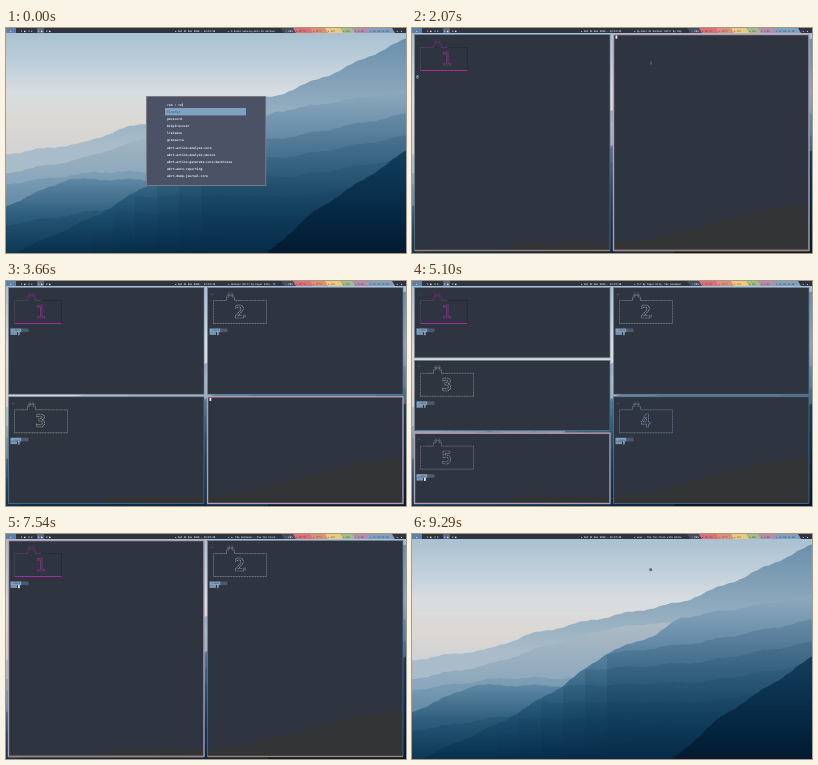
An HTML page with a canvas that plays this animation: 400 px wide and 225 px high, repeating every 9430 ms.

```html
<!DOCTYPE html>
<html lang="en">
<head>
<meta charset="utf-8">
<title>Tiling desktop</title>
<style>
html, body { margin: 0; width: 100%; height: 100%; overflow: hidden; background: #2e3440; }
canvas { display: block; width: 400px; height: 225px; }
</style>
</head>
<body>
<canvas id="stage" width="400" height="225"></canvas>
<script>
const LOOP = 9430, W = 400, H = 225;
const MONO = '"DejaVu Sans Mono", monospace';
const LIGHT = '#e5e9f0', BLUE = '#81a1c1', DARK = '#2e3440';
const stage = document.getElementById('stage').getContext('2d');
let g = stage;

const ramp = (t, start, length) => Math.max(0, Math.min(1, (t - start) / length));
const smooth = v => v * v * (3 - 2 * v);

function box(x, y, w, h, color) {
  g.fillStyle = color;
  g.fillRect(x, y, w, h);
}
function text(s, x, y, size, color, weight = '') {
  g.font = `${weight} ${size}px ${MONO}`;
  g.fillStyle = color;
  g.fillText(s, x, y);
}
function line(points, color, width = 0.6) {
  g.strokeStyle = color;
  g.lineWidth = width;
  g.beginPath();
  points.forEach(([x, y]) => g.lineTo(x, y));
  g.stroke();
}
function gradient(y0, y1, colors) {
  const fill = g.createLinearGradient(0, y0, 0, y1);
  colors.forEach((c, i) => fill.addColorStop(i / (colors.length - 1), c));
  return fill;
}

// ---------- wallpaper ----------
// A slope through a few key points, roughened by two sines.
function ridge(points, colors) {
  const top = Math.min(...points.map(p => p[1]));
  g.fillStyle = gradient(top, H, colors);
  g.beginPath();
  g.moveTo(points[0][0], H);
  points.slice(1).forEach(([bx, by], i) => {
    const [ax, ay] = points[i];
    for (let x = ax; x <= bx; x++)
      g.lineTo(x, ay + (by - ay) * (x - ax) / (bx - ax) + Math.sin(x * 0.55) * 0.3 + Math.sin(x * 0.14) * 0.9);
  });
  g.lineTo(points.at(-1)[0], H);
  g.fill();
}
function paintWallpaper() {
  const canvas = document.createElement('canvas');
  canvas.width = W;
  canvas.height = H;
  g = canvas.getContext('2d');
  box(0, 0, W, H, gradient(0, 130, ['#a6bfd1', '#bccdd9', '#d8dde0', '#dcd8d3', '#ced1d4']));
  ridge([[60, 122], [115, 101], [180, 86], [270, 68], [330, 44], [400, 11]], ['#6b90ac', '#a9bdca', '#b9c8d1']);
  ridge([[0, 126], [85, 114], [180, 130]], ['#aabcc9', '#a9bdca']);
  ridge([[0, 145], [75, 131], [140, 110], [190, 96], [240, 89], [290, 90]], ['#adbbc5', '#88a5bb', '#41708f']);
  ridge([[0, 156], [90, 144], [170, 144]], ['#7f9fb6', '#41708f']);
  ridge([[0, 178], [62, 151], [150, 152], [180, 160]], ['#5f88a4', '#2c5d7c', '#123f5d']);
  ridge([[0, 197], [120, 178]], ['#2c5d7c', '#0c3854']);
  ridge([[10, 224], [90, 188], [150, 152], [195, 119], [245, 100], [268, 84], [400, 62]],
    ['#8ea9bd', '#6a8fab', '#427190', '#1d4e6e', '#07304d']);
  for (let k = 0; k < 6; k++)
    ridge([[195 - 22 * k, 120 + 16 * k], [290, 108 + 20 * k], [W, 86 + 22 * k]], ['#123f5d2c', '#04284530']);
  ridge([[262, 224], [310, 182], [360, 150], [W, 123]], ['#123f5d', '#072c49', '#021a31']);
  g = stage;
  return canvas;
}
const wallpaper = paintWallpaper();

// ---------- top bar ----------
const SONG = 'A Quiet Lake-by-Owls On Harbour Hill? By Paper Kite, The Gardener - The Tin Clock with Winter - Low Tide Suite';
const PILLS = [
  [275, '#434c5e', ' ♪ 26%'], [287, '#dc6f78', '▪ 28 5%'], [304, '#dd9078', '▪ 47°C'], [319, '#ebcb7f', '▪ 12%'],
  [334, '#a3be8c', '▪ 68%'], [346, '#b48ead', '▪ 3.4G'], [361, BLUE, '▪ 21 kB 14 kB'], [386, DARK, ' ▪  ▪']
];
function drawBar(t) {
  const label = (s, x, color = LIGHT) => text(s, x, 3.6, 2.4, color, 'bold');
  box(0, 0, W, 5, DARK);
  box(0, 0, 10, 5, '#5e81ac');
  box(31, 0, 7, 5, '#56657d');
  label('▪', 4);
  label('1 ■  2 ≡', 15);
  label('3 ■', 32);
  label('4 ■', 40);
  label(`▪ Sat 21 Dec 2019 - 12:37:${20 + Math.floor((t + 910) / 1000)}`, 169);
  const at = Math.floor(t / 150);
  label('▪ ' + SONG.slice(at, at + 31), 222, '#c9cfd9');
  for (const [x, fill, s] of PILLS) {
    g.fillStyle = fill;
    g.beginPath();
    for (const [px, py] of [[x, 0], [W, 0], [W, 5], [x + 3, 5]]) g.lineTo(px, py);
    g.fill();
    label(s, x + 3, s[0] === ' ' ? LIGHT : '#2e344099');
  }
}

// ---------- launcher ----------
const PROGRAMS = ['firefox', 'pmrecord', 'bzip2recover', 'lrelease', 'gresource', 'abrt-action-analyze-core',
  'abrt-action-analyze-vmcore', 'abrt-action-generate-core-backtrace', 'abrt-auto-reporting',
  'abrt-dump-journal-core', 'cool-retro-term'];
function drawLauncher(t) {
  const query = 'retro'.slice(0, 2 + Math.floor(t / 150));
  g.globalAlpha = 1 - ramp(t, 640, 330);
  box(140, 68, 120, 89.5, '#4b5266');
  g.strokeStyle = '#8b8588';
  g.lineWidth = 0.8;
  g.strokeRect(140.4, 68.4, 119.4, 89);
  text('run : ' + query, 161, 78, 3.1, LIGHT, 'bold');
  box(161 + (6 + query.length) * 1.87, 75.3, 0.6, 3.2, LIGHT);
  box(159, 80, 81, 7.4, BLUE);
  PROGRAMS.filter(p => p.includes(query)).slice(0, 10).forEach((p, i) =>
    text(p, 161, 85 + i * 7.12, 3.1, i ? LIGHT : '#4a6486', 'bold'));
  g.globalAlpha = 1;
}

// ---------- terminals ----------
const INKS = ['#a02b9c', '#a4a9b1', '#aeb09a', '#7f9fbd', '#8f97a8'];
const CLOSE = [8540, 7810, 6890, 6300, 5910];
const TERMS = INKS.map((ink, i) => {
  const open = 1020 + 755 * i;
  return { ink, open, art: open + 900, prompt: open + 1055, close: CLOSE[i], fadeIn: i ? 290 : 600, fadeOut: i ? 300 : 720 };
});

// Windows fill two columns in turn; each column shares its height evenly.
function place(i, count) {
  const col = i % 2, rows = Math.ceil((count - col) / 2), step = 218.5 / rows;
  return { x: col ? 201.5 : 2.5, y: 6.5 + (i >> 1) * step, w: count === 1 ? 395 : 195.5, h: step - 2.5 };
}

function drawArt(i, x, y, ink) {
  const mid = x + 23, right = x + (i ? 59 : 53), top = y + 13, bottom = y + 36;
  g.setLineDash([1.1, 0.5]);
  for (const s of [-1, 1])
    line([[mid + s * 10, top], [mid + s * 4, top], [mid + s * 4, y + 9.5], [mid + s * 1.5, y + 9.5], [mid + s * 1.5, y + 5]], ink);
  line([[mid - 3.5, y + 7.5], [mid + 3.5, y + 7.5]], ink);
  line([[mid - 10, top], [x + 6, top], [x + 6, bottom]], i ? ink : '#6f6077', 0.5);
  line([[mid + 10, top], [right, top], [right, bottom]], i ? ink : '#171b24', 0.5);
  if (!i) g.setLineDash([]);
  line([[x + 6, bottom], [right, bottom]], ink, i ? 0.6 : 1.2);
  g.font = `${i ? 'bold' : ''} 17px ${MONO}`;
  g.lineWidth = 0.7;
  g.strokeStyle = ink;
  g.strokeText(i + 1, x + 27, y + 30.5);
  g.setLineDash([]);
  text('~/', x + 3, y + 7, 2.4, ink);
}
function drawCaret(x, y, focused) {
  if (focused) return box(x, y, 1.8, 3.2, LIGHT);
  g.strokeStyle = '#c3cad6';
  g.lineWidth = 0.5;
  g.strokeRect(x + 0.3, y + 0.3, 1.3, 2.6);
}
function drawPrompt(x, y) {
  box(x + 2, y + 41, 11, 3.6, BLUE);
  box(x + 13, y + 41, 7, 3.6, '#4c5a70');
  box(x + 2, y + 44.6, 6.5, 2.8, '#7897b8');
  text('~/demo', x + 3, y + 43.8, 2.4, '#34465c');
}
// Dark foot of the wallpaper showing through a settled terminal.
function drawShade() {
  g.fillStyle = '#323435';
  g.beginPath();
  g.moveTo(100, H);
  for (let x = 100; x <= W; x += 4) g.lineTo(x, 215 - 38 * smooth(ramp(x, 195, 205)) + Math.sin(x * 0.14));
  g.lineTo(W, H);
  g.fill();
}

function drawWindow(i, t, count) {
  const term = TERMS[i], closing = t >= term.close;
  const { x, y, w, h } = place(i, closing ? i + 1 : count);
  const focused = i === (t > CLOSE[4] ? 0 : count - 1);
  const shown = ramp(t, term.open, term.fadeIn);
  g.globalAlpha = closing ? 1 - ramp(t, term.close, term.fadeOut) : shown;
  g.save();
  g.beginPath();
  g.rect(x, y, w, h);
  g.clip();
  box(x, y, w, h, DARK);
  if (shown === 1 && !closing) drawShade();
  if (t >= term.art) drawArt(i, x, y, term.ink);
  if (t >= term.prompt) {
    drawPrompt(x, y);
    drawCaret(x + 9.5, y + 44.5, focused);
  } else drawCaret(x + 2, y + (t >= term.art ? 41 : 1), focused);
  g.restore();
  g.strokeStyle = focused ? '#b69aae' : '#64758a';
  g.lineWidth = focused ? 1.4 : 0.7;
  g.strokeRect(x, y, w, h);
  if (h > 200) box(x, y + h - 0.7, w, 1.4, '#a9806f');
  g.globalAlpha = 1;
}

function drawPointer(windows) {
  if (windows) {
    line([[239, 33], [239, 37]], '#1d222c', 1.4);
    line([[239, 33.4], [239, 36.6]], '#cfd5df');
  } else {
    text('●', 237.2, 36.6, 5, '#4c566a');
    box(238.2, 34.2, 1.4, 1.4, '#b77f86');
  }
}

function draw(t) {
  g.drawImage(wallpaper, 0, 0);
  const count = TERMS.filter(w => t >= w.open && t < w.close).length;
  TERMS.forEach((w, i) => {
    if (t >= w.open && t < w.close + w.fadeOut) drawWindow(i, t, count);
  });
  if (t < 970) drawLauncher(t);
  else drawPointer(count);
  drawBar(t);
}

const start = performance.now();
function tick() {
  draw((performance.now() - start) % LOOP);
  requestAnimationFrame(tick);
}
tick();
</script>
</body>
</html>
```
